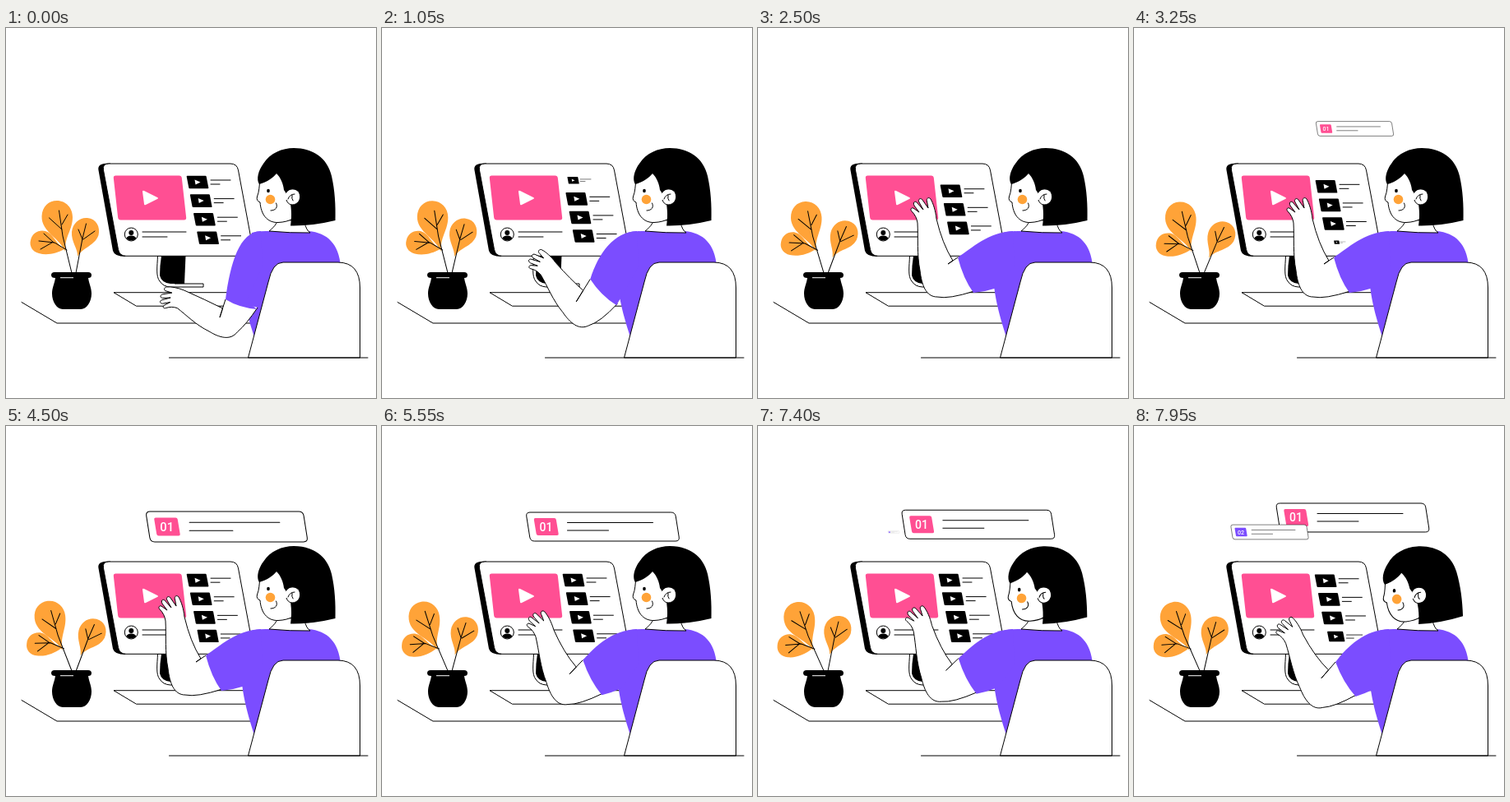
Recreate the animation shown at these times as an HTML page. Size 450 by 450 pixels, loop 8 s.

```html
<!DOCTYPE html>
<html lang="en">
<head>
<meta charset="utf-8">
<title>Video lesson</title>
<style>
  html, body { margin: 0; width: 100%; height: 100%; overflow: hidden; background: #fff; }
  svg { display: block; width: 100%; height: 100%; }
  .line { fill: none; stroke: #000; stroke-width: 1; stroke-linecap: round; stroke-linejoin: round; }
  .box { fill: #fff; stroke: #000; stroke-width: 1; stroke-linejoin: round; }
  .pink { fill: #ff4f93; }
  .purple { fill: #7b4dff; }
  .orange { fill: #ffa338; }
  .white { fill: #fff; }
  text { font: 500 14px Roboto, Arial, sans-serif; fill: #fff; text-anchor: middle; }
</style>
</head>
<body>
<svg viewBox="0 0 450 450">
  <path class="line" d="M19 333.500L62 359H297"/>
  <path class="box" d="M297 321.700H131L158.500 338.200H297"/>

  <g id="plant">
    <g id="leftLeaves">
      <path class="orange" d="M71 269C62 274 50 277 40 274C32 272 28 265 30 258C32 249 40 245 48 247C58 250 60 262 71 269Z"/>
      <path class="orange" d="M72 272C66 256 43 248 43.500 229C44 217 52 210 62 210C73 210 81 219 81 230C81 246 71 254 72 272Z"/>
      <path class="line" d="M64.500 222L69 253L80 298M52.500 231L68 245M75 227L68 239M40 259L59 261L74 270M46 250L58 261M42 269L56 261"/>
    </g>
    <g id="rightLeaf">
      <path class="orange" d="M87 278C88 269 79 260 80 248C81 237 90 230 99 231C110 232 115 242 112.500 252C108 265 94 266 87 278Z"/>
      <path class="line" d="M97.500 238L93 256L85 298M108 247L94 257M88 245L93 257"/>
    </g>
    <path d="M59 297H100Q104 297 104 300.500Q104 304 100 304C101 311 104 316 104 323C104 333 98 342 91 342H69C62 342 56 333 56 323C56 316 59 311 60 304Q55 304 55 300.500Q55 297 59 297Z"/>
    <path class="white" d="M66 303.200H82V304.200H66Z"/>
  </g>

  <path class="box" d="M184.500 277C184 290 182 302 187 308Q191 314.500 200 315H240V311H205L192 277Z"/>
  <path d="M189 277H218.500L217 311H200Q189 310 187 301Q187 289 189 277Z"/>
  <path d="M127 164.600Q110.500 164 112.500 173L130 271Q132 278 145 278L150 270Z"/>
  <g id="screen"></g>
  <g id="list"></g>

  <g id="card1"></g>
  <g id="card2"></g>

  <path class="purple" d="M299 249C306 247 314 247 322 247H368C391 249 405 263 407 290L330 310L302 376C296 357 290 338 287 314Z"/>
  <path class="box" d="M331 232C329 239 325 243 320 247Q346 249.500 370 249Q365 246 363 236Z"/>
  <path class="box" id="arm"/>
  <path class="purple" id="sleeve"/>

  <g id="head">
    <path class="box" d="M309 184C308 192 308 199 305.500 205Q304 210 309 212C310 226 317 237 331 236.500C345 236 356 230 360 220L350 172L328 175Z"/>
    <path d="M308 190C304 184 307 173 313 165C321 152 336 146 350 146C373 146 391 158 396 180C400 198 401 215 400.500 234Q372 241 346 240.500C348 228 347 215 344 206L338 197C337 189 334 182 329 177C325 182 318 187 308 190Z"/>
    <path class="box" d="M341 200C344 194.500 353 194.500 356.500 200C360 208 355 215 348 215C344 215 342 212 341 209"/>
    <path class="line" d="M343 208Q345 202 351 202M348 203Q347 208 349 210M322 222C328 222 331 218 328.500 213"/>
    <ellipse cx="319" cy="198" rx="1.800" ry="2.300"/>
    <circle class="orange" cx="321.500" cy="208.500" r="5.800"/>
  </g>

  <path class="box" d="M294.500 401L319 309Q324 285 337 285H404Q430.500 285.500 430.500 316V401Z"/>
  <path class="line" d="M198.500 401H440"/>
</svg>
<script>
const LOOP = 8000;
const $ = id => document.getElementById(id);
const set = (id, name, value) => $(id).setAttribute(name, value);
const mix = (a, b, k) => a + (b - a) * k;
const ease = (t, from, to) => {
  const k = Math.min(1, Math.max(0, (t - from) / (to - from)));
  return (1 - Math.cos(Math.PI * k)) / 2;
};
const at = (x, y, s) => `translate(${x} ${y}) scale(${s})`;

// Slanted box with rounded corners
function slab(x, y, w, h, skew, r) {
  const p = [[x, y], [x + w, y], [x + w + skew, y + h], [x + skew, y + h]];
  const toward = (a, b) => {
    const k = r / Math.hypot(b[0] - a[0], b[1] - a[1]);
    return [mix(a[0], b[0], k), mix(a[1], b[1], k)];
  };
  return 'M' + p.map((c, i) =>
    `${toward(c, p[(i + 3) % 4])}Q${c} ${toward(c, p[(i + 1) % 4])}`).join('L') + 'Z';
}

$('screen').innerHTML = `
  <path class="box" d="${slab(117, 165, 164, 112.3, 21, 8)}"/>
  <path class="pink" d="${slab(130.5, 179.500, 83, 54, 6, 3)}"/>
  <path class="white" d="M166 199Q166 197 168 198L184 206Q186 207 184 208L170 215Q168 216 168 214Z"/>
  <circle class="box" cx="152.300" cy="251" r="8"/>
  <circle cx="152.300" cy="249" r="3"/>
  <path d="M146.300 256Q147.300 252.500 152.300 252.500Q157.300 252.500 158.300 256Q152.300 261 146.300 256Z"/>
  <path class="line" d="M166 248H219M166 254H196"/>`;

$('list').innerHTML = `<g>
  <path d="${slab(-13.5, -7.8, 24, 15.6, 3, 1)}"/>
  <path class="white" d="M-3.500 -3L3.500 0L-2.500 3Z"/>
  <path class="line" d="M16 -2.500H40M16 2.500H27"/></g>`.repeat(5);
const items = [...$('list').children];

const card = (label, color) => `
  <path class="box" d="${slab(-93.5, -17.500, 181.500, 35, 5.500, 5)}"/>
  <path class="${color}" d="${slab(-84, -10.500, 27, 21, 3.500, 2)}"/>
  <text x="-69" y="5">${label}</text>
  <path class="line" d="M-43 -5H61M-43 4.500H7"/>`;
$('card1').innerHTML = card('01', 'pink');
$('card2').innerHTML = card('02', 'purple');

const turn = (x, y, deg) => {
  const a = deg * Math.PI / 180, c = Math.cos(a), s = Math.sin(a);
  return [x * c - y * s, x * s + y * c];
};
const bend = (a, b, c, u) =>
  [0, 1].map(i => mix(mix(a[i], b[i], u), mix(b[i], c[i], u), u));

// Fingers, from the right side of the hand to the left
const HAND = `217,232 C216,222 213,213 210,208 C208,205 204,207 205.500,211
  L207,219 L200,209 C198,206 194,208 196,212 L201,221 L193,212
  C191,210 188,212 190,216 L196,224 L189,219 C186,218 185,221 187,223
  C191,227 193,231 194,237`;

// raise: 0 = hand on the desk, 1 = hand at the screen
function drawArm(raise, tilt) {
  const low = 1 - raise;
  const reach = turn(75, 0, 163.7 - 57 * low);
  const elbow = [291 + reach[0], 287 + reach[1]];
  const fore = (x, y) => {
    const p = turn(x - 219, (y - 308) * (1 - .15 * low), -51 * low ** 1.33 - tilt);
    return [elbow[0] + p[0], elbow[1] + p[1]].map(v => v.toFixed(2)).join();
  };
  const hand = (x, y) => {
    const p = turn(x - 206, y - 233, -8 * low ** 3);
    return fore(206 + p[0], 233 + p[1]);
  };
  const place = (path, f) => path.replace(/([\d.]+),([\d.]+)/g, (_, x, y) => f(+x, +y));
  const a = bend([267, 330], [245, 293], [243, 279], raise);
  const b = bend([305, 342], [276, 338], [262, 322], raise);
  const crease = bend([260, 352], [218, 331], [231, 287], raise);
  const fold = [mix(a[0], crease[0], .5), mix(a[1], crease[1], .5)];

  set('arm', 'd', `M${a}L${crease}L${fold}` +
    place('Q224,262 ', fore) + place(HAND, hand) +
    place('C195,255 193,275 197,295 C199,312 204,327 218,327 Q232,330 ', fore) +
    `${b[0] + 1} ${b[1] - 2}`);
  set('sleeve', 'd', `M310 247C${mix(284, 280, raise)} 248 ` +
    `${a[0] + mix(6, 17, raise)} ${a[1] + mix(-45, -11, raise)} ${a}` +
    `Q${(a[0] + b[0]) / 2 - 3} ${(a[1] + b[1]) / 2 + 4} ${b}` +
    `Q${mix(b[0], 291, .5)} ${mix(b[1], 318, .3)} 291 ${mix(335, 316, raise)}L312 290Z`);
}

function drawList(t) {
  const back = t - 7300;
  const shift = ease(t, 100, 4750) - ease(back, 100, 4750);
  const size = [
    1 - ease(t, 0, 2200), 1, 1, 1,
    ease(t, 2500, 4700) - ease(back, 0, 2200)
  ];
  items.forEach((item, i) => {
    const row = i - shift;
    item.setAttribute('transform', at(233 + 4.2 * row, 187.5 + 22.6 * row, size[i]));
  });
}

const pop = t => 1.11 * ease(t, 0, 1800) - .11 * ease(t, 1800, 2400);

function draw(t) {
  const sway = -10.5 * ease(t, 0, 7000) + 10.5 * ease(t, 7000, 14000);
  const swing = 12 * Math.sin(Math.PI * t / 7000) ** 2;
  set('leftLeaves', 'transform', `rotate(${sway} 78 298)`);
  set('rightLeaf', 'transform', `rotate(${swing} 82 298)`);

  const wave = t > 4900 ? (1 - Math.cos(Math.PI * (t - 4900) / 1000)) / 2 : 0;
  drawArm(ease(t, 0, 2500) - .24 * wave, 7 * wave);
  drawList(t);

  const lift = Math.max(0, (t - 6850) / 1100) ** 2;
  set('card1', 'transform', at(268.5 - 2.5 * lift, 122.5 - 11 * lift, pop(t - 2400)));
  set('card2', 'transform', at(165, 129, pop(t - 7100)));
  set('head', 'transform', `rotate(${-3.5 * ease(t, 6800, 8000)} 355 240)`);
}

function frame(now) {
  draw(now % LOOP);
  requestAnimationFrame(frame);
}
draw(0);
requestAnimationFrame(frame);
</script>
</body>
</html>
```
